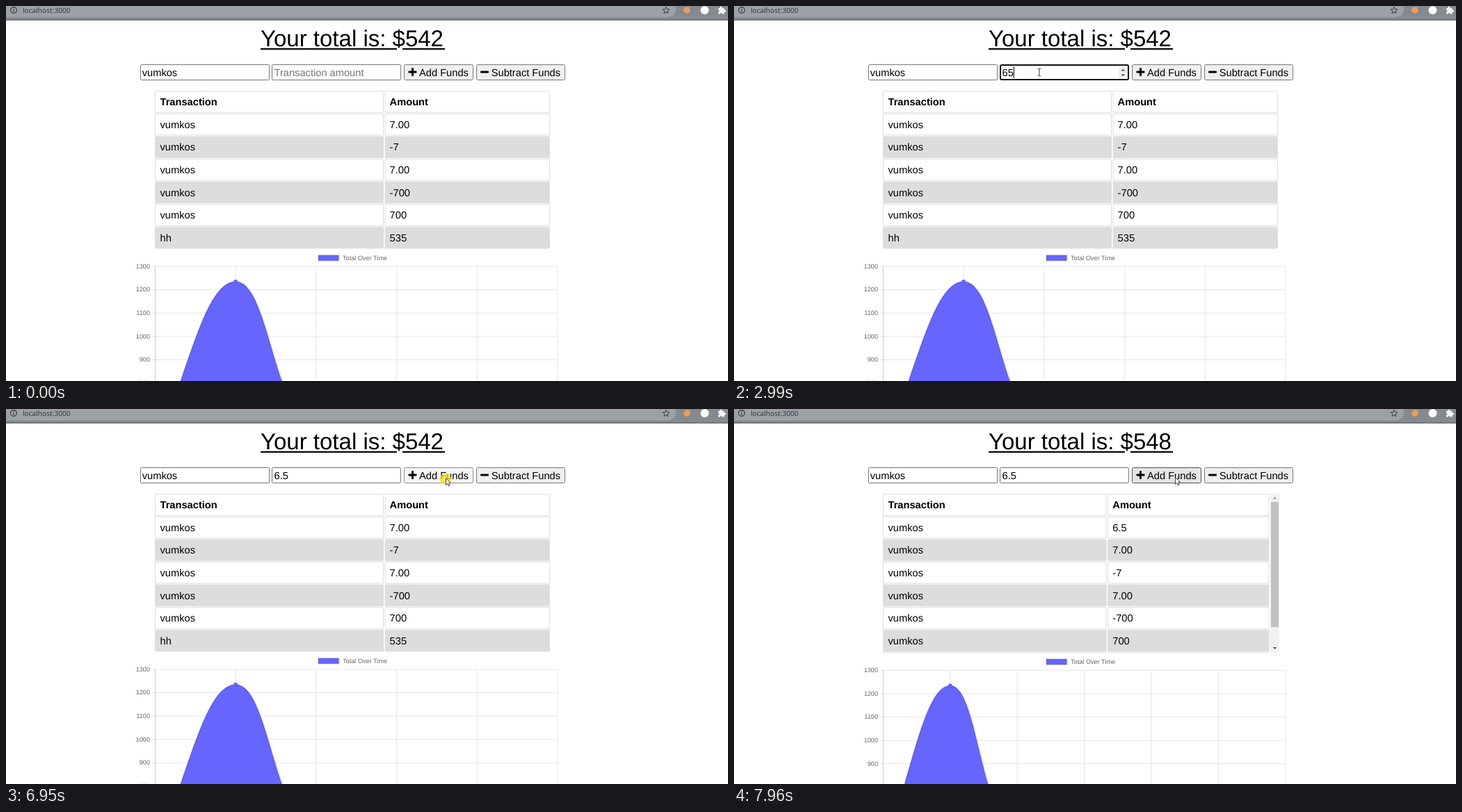
Recreate the animation shown at these times as an HTML page with a canvas. Size 1038 by 540 pixels, loop 8000 ms.

```html
<!DOCTYPE html>
<html lang="en">
<head>
<meta charset="utf-8">
<title>Budget tracker</title>
<style>
html, body { margin: 0; width: 100%; height: 100%; overflow: hidden; background: #fff; }
canvas { display: block; }
</style>
</head>
<body>
<canvas id="stage" width="1038" height="540"></canvas>
<script>
const ctx = document.getElementById('stage').getContext('2d');
const LOOP = 8000, FOCUS = 1680, BLUR = 6870, ADDED = 7030;
const SANS = '"Liberation Sans", Arial, sans-serif';
const BODY = '14.67px ' + SANS, SMALL = '9.17px ' + SANS;
const SHOP = 'vumkos', VIOLET = '#6666ff';
const ROWS = [[SHOP, '7.00'], [SHOP, '-7'], [SHOP, '7.00'], [SHOP, '-700'], [SHOP, '700'], ['hh', '535']];
const TOTALS = [535, 1235, 535, 542, 535, 542, 548.5];

// [start, end, steps, waypoints evenly spaced in time]
const MOVES = [
  [280, 1070, 10, [[934, 531], [800, 425], [640, 300], [500, 195], [410, 137], [361, 117]]],
  [1130, 1760, 8, [[375, 116], [395, 113], [416, 110], [435, 106], [438, 102], [440, 99], [440, 97], [440, 96], [440, 96]]],
  [1900, 1901, 1, [[439, 95], [439, 95]]],
  [6020, 6640, 8, [[446, 98], [480, 109], [525, 121], [570, 127], [606, 116], [626, 96], [634, 83], [633, 92], [632, 99]]],
  [7430, 7510, 1, [[633, 98], [634, 98]]]
];
// [time, field text, caret visible]
const TYPING = [
  [FOCUS, '', 1], [2220, '', 0], [2680, '', 1], [2760, '6', 1], [2990, '65', 1], [3540, '65', 0],
  [4000, '65', 1], [4460, '65', 0], [4540, '6', 1], [5090, '6', 0], [5240, '6.', 1], [5390, '6.5', 1], [5940, '6.5', 0]
];

function text(str, x, y, color = '#000', font = BODY, align = 'left') {
  ctx.font = font;
  ctx.fillStyle = color;
  ctx.textAlign = align;
  ctx.fillText(str, x, y);
}
function rect(x, y, w, h, color) {
  ctx.fillStyle = color;
  ctx.fillRect(x, y, w, h);
}
function box(x, y, w, h, fill, border, line = 1, radius = 0) {
  ctx.beginPath();
  ctx.roundRect(x + line / 2, y + line / 2, w - line, h - line, radius);
  paint(fill, border, line);
}
function paint(fill, border, line = 1) {
  if (fill) { ctx.fillStyle = fill; ctx.fill(); }
  if (border) { ctx.strokeStyle = border; ctx.lineWidth = line; ctx.stroke(); }
}
function poly(points, fill, border, line) {
  ctx.beginPath();
  points.forEach(p => ctx.lineTo(p[0], p[1]));
  ctx.closePath();
  paint(fill, border, line);
}
function disc(x, y, r, fill, border, line) {
  ctx.beginPath();
  ctx.arc(x, y, r, 0, 7);
  paint(fill, border, line);
}
function triangle(x, y, dir, color, w = 2.8, h = 3) {
  poly([[x - w, y], [x + w, y], [x, y + dir * h]], color);
}

function pointerAt(t) {
  const move = MOVES.filter(m => t >= m[0]).pop();
  if (!move) return null;
  const [start, end, steps, path] = move;
  const k = Math.min(steps, Math.floor((t - start) / (end - start) * steps + 0.1)) / steps;
  const pos = k * (path.length - 1), i = Math.min(path.length - 2, Math.floor(pos));
  return path[i].map((a, n) => a + (path[i + 1][n] - a) * (pos - i));
}

function drawBrowserBar() {
  rect(0, 0, 1038, 20, '#858a90');
  ctx.beginPath();
  ctx.roundRect(-20, -8, 983, 24.5, 12);
  paint('#9ca1a8');
  rect(0, 19.5, 1038, 1.3, '#5f6368');
  disc(11, 6, 4.4, null, '#303338', 1.1);
  rect(10.5, 5.3, 1.1, 3.3, '#303338');
  rect(10.5, 3.3, 1.1, 1.2, '#303338');
  text('localhost:3000', 24, 9.8, '#303338', '10.2px "Open Sans", "Noto Sans", sans-serif');
  const star = Array.from({ length: 10 }, (_, i) => {
    const r = i % 2 ? 2.2 : 5.2, a = (i / 5 - 0.5) * Math.PI;
    return [949 + r * Math.cos(a), 6.4 + r * Math.sin(a)];
  });
  poly(star, null, '#3c4045', 1);
  disc(979, 6, 4.8, '#eb9c5c');
  disc(1004.5, 6, 6, '#fff');
  rect(1024, 3, 8.5, 8.5, '#f4f5f6');
  disc(1028, 2.7, 1.9, '#f4f5f6');
  disc(1033, 7.2, 1.9, '#f4f5f6');
  disc(1024, 7.2, 1.4, '#858a90');
  disc(1028.2, 11.5, 1.4, '#858a90');
}

function drawTitle(total) {
  text('Your total is: $' + total, 366, 58, '#000', '33px ' + SANS);
  rect(366, 60.7, 196, 2.2, '#000');
  rect(570, 60.7, 61, 2.2, '#000');
}

function drawForm(t, overField, overAdd) {
  const focused = t >= FOCUS && t < BLUR, pressed = t >= BLUR && t < ADDED;
  const [, typed, caret] = TYPING.filter(s => t >= s[0]).pop() || [0, '', 0];
  box(193, 84, 186, 23, '#fff', '#767676', 1, 1);
  text(SHOP, 195.7, 100.5);
  box(382, 84, 186, 23, '#fff', focused ? '#101010' : '#767676', focused ? 2 : 1, focused ? 2 : 1);
  text(typed || 'Transaction amount', 385.5, 100.5, typed ? '#000' : '#757575');
  if (focused && caret) rect(385.5 + ctx.measureText(typed).width, 87, 1, 17, '#000');
  if (focused || overField) {
    rect(553, 87.5, 13, 16, '#f0f0f0');
    triangle(559.3, 93.5, -1, '#505050');
    triangle(559.3, 98.2, 1, '#505050');
  }
  const [fill, edge] = pressed ? ['#f5f5f5', '#8d8d8d'] : overAdd ? ['#e5e5e5', '#4f4f4f'] : ['#efefef', '#767676'];
  box(572, 84, 100, 23, fill, edge, 1, 2);
  box(676, 84, 128, 23, '#efefef', '#767676', 1, 2);
  box(578.5, 93.5, 12, 3, '#000', null, 0, 1);
  box(583, 89, 3, 12, '#000', null, 0, 1);
  box(682, 93.5, 12, 3, '#000', null, 0, 1);
  text('Add Funds', 594, 100.5);
  text('Subtract Funds', 697.7, 100.5);
}

function drawTable(added) {
  const split = added ? 535.7 : 543, right = added ? 769.5 : 782, second = split + 1.6;
  const rows = [['Transaction', 'Amount'], ...(added ? [[SHOP, '6.5']] : []), ...ROWS].slice(0, 7);
  rows.forEach((row, i) => {
    const y = 122.2 + i * 32.6, fill = i && i % 2 === 0 ? '#ddd' : '#fff';
    const font = (i ? '' : 'bold ') + BODY;
    box(214, y, split - 214, 31.6, fill, '#ddd');
    box(second, y, right - second, 31.6, fill, '#ddd');
    text(row[0], 221.5, y + 20.9, '#000', font);
    text(row[1], second + 7, y + 20.9, '#000', font);
  });
  if (!added) return;
  rect(214, 350.3, split - 214, 0.9, '#ddd');
  rect(second, 350.3, right - second, 0.9, '#ddd');
  rect(771, 122, 13, 229, '#f1f1f1');
  rect(772, 134, 11, 180, '#c1c1c1');
  triangle(777.5, 129.5, -1, '#a3a3a3');
  triangle(777.5, 343, 1, '#505050');
}

// Cardinal spline handles: each bends with the distance to both neighbours.
function handles(prev, cur, next, tension = 0.4) {
  const a = Math.hypot(cur[0] - prev[0], cur[1] - prev[1]);
  const b = Math.hypot(next[0] - cur[0], next[1] - cur[1]);
  const offset = d => cur.map((c, n) => c + d * tension / (a + b) * (next[n] - prev[n]));
  return [offset(-a), offset(b)];
}

function drawChart(added, grow) {
  const left = 214.4, right = 793, top = added ? 376.3 : 375, unit = 0.3363;
  const yOf = v => top + (1300 - v) * unit, base = yOf(500);
  const totals = TOTALS.slice(0, added ? 7 : 6), gap = (right - left) / (totals.length - 1);
  box(448, top - 17.2, 31.5, 10, VIOLET, 'rgba(0,0,0,.1)', 2);
  text('Total Over Time', 484, top - 9.2, '#666', SMALL);
  for (let v = 1300; v >= 800; v -= 100) {
    rect(209.6, yOf(v) - 0.5, right - 209.6, 1, 'rgba(0,0,0,.1)');
    text(v, 207, yOf(v) + 2.8, '#666', SMALL, 'right');
  }
  totals.forEach((_, i) => rect(left + i * gap - 0.5, top, 1, 200, i ? 'rgba(0,0,0,.1)' : 'rgba(0,0,0,.22)'));

  const points = totals.map((v, i) => [left + i * gap, yOf(v)]);
  const bends = points.map((p, i) => handles(points[i - 1] || p, p, points[i + 1] || p));
  const lift = ([x, y]) => [x, base - (base - y) * grow];
  const line = new Path2D();
  line.moveTo(...lift(points[0]));
  for (let i = 1; i < points.length; i++) {
    line.bezierCurveTo(...lift(bends[i - 1][1]), ...lift(bends[i][0]), ...lift(points[i]));
  }
  const area = new Path2D(line);
  area.lineTo(right, base);
  area.lineTo(left, base);
  ctx.fillStyle = VIOLET;
  ctx.fill(area);
  ctx.strokeStyle = 'rgba(0,0,0,.1)';
  ctx.lineWidth = 2.75;
  ctx.stroke(line);
  points.forEach(p => disc(...lift(p), 2.75, VIOLET, 'rgba(0,0,0,.1)', 0.9));
}

function drawPointer([x, y], overField, clicking) {
  if (clicking) disc(x, y + 2, 8.5, 'rgba(255,222,30,.72)');
  if (overField) {
    rect(x - 0.5, y - 5, 1, 11, '#333');
    rect(x - 2.7, y - 5.3, 5.4, 0.9, '#555');
    rect(x - 2.7, y + 5.3, 5.4, 0.9, '#555');
    return;
  }
  const shape = [[0, 0], [0, 10], [2.3, 8], [3.8, 11.5], [5.4, 10.8], [4, 7.4], [7, 7.2]];
  poly(shape.map(([dx, dy]) => [x + 0.5 + dx, y + 0.5 + dy]), '#fff', '#333', 0.9);
}

function draw(t) {
  const added = t >= ADDED, pointer = pointerAt(t);
  const over = (x0, x1) => pointer && pointer[0] > x0 && pointer[0] < x1 && pointer[1] > 84 && pointer[1] < 107;
  const overField = over(382, 568), overAdd = over(572, 672);
  const chartTime = 7270 + Math.floor((t - 7270) / 76.6) * 76.6;
  const progress = Math.min(1, Math.max(0, (chartTime - 7020) / 1000));
  ctx.textRendering = 'geometricPrecision';
  rect(0, 0, 1038, 540, '#fff');
  drawBrowserBar();
  drawTitle(added ? 548 : 542);
  drawForm(t, overField, overAdd);
  drawTable(added);
  drawChart(added, added ? 1 - (1 - progress) ** 4 : 1);
  const clicking = (t >= FOCUS && t < 1760) || (t >= BLUR && t < ADDED);
  if (pointer) drawPointer(pointer, overField, clicking);
}

function tick() {
  draw(performance.now() % LOOP);
  requestAnimationFrame(tick);
}
tick();
</script>
</body>
</html>
```
